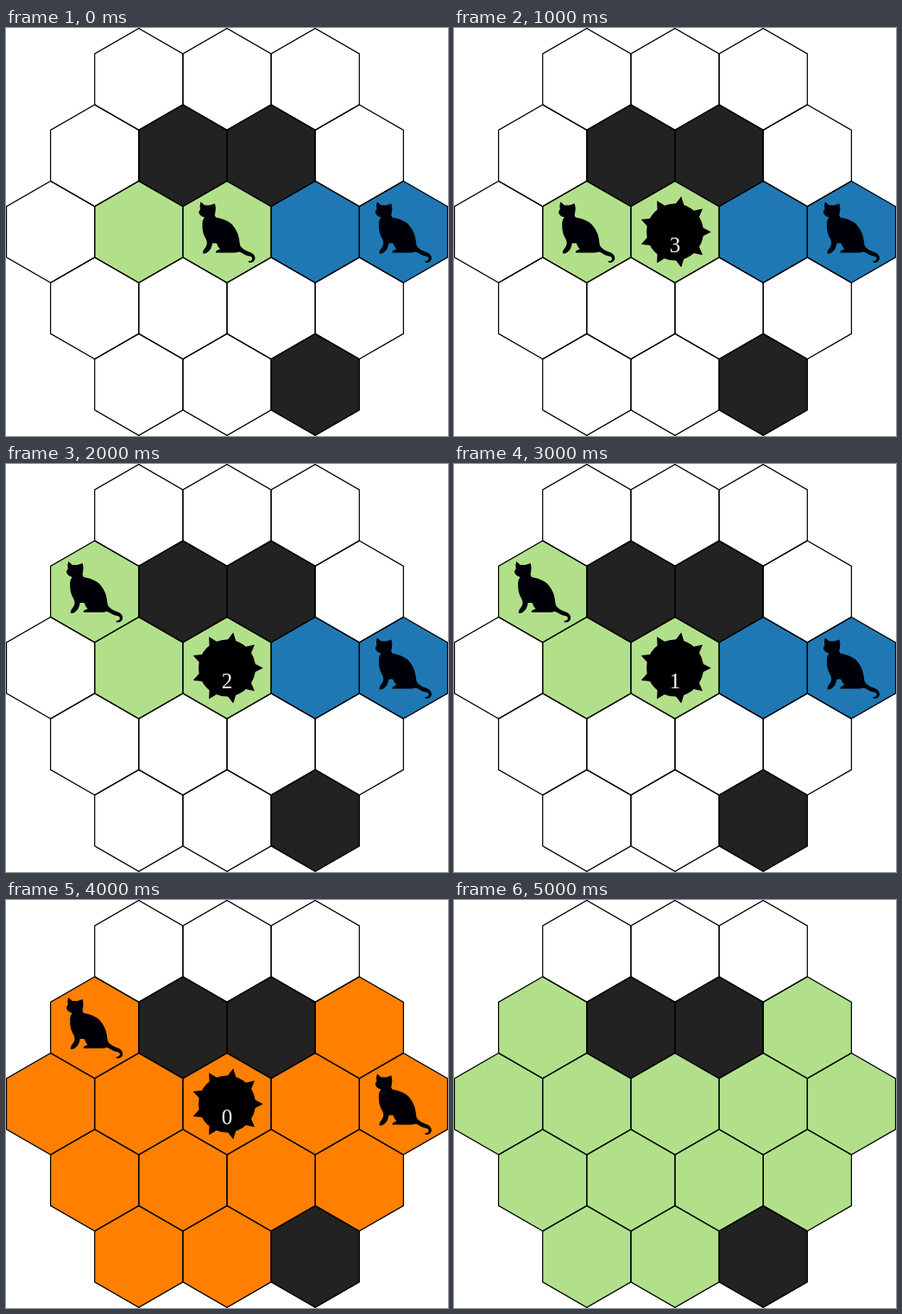
Write an HTML page with a canvas that moves like this. It is 512 by 473 pixels and loops after 6000 ms.

```html
<!DOCTYPE html>
<html lang="en">
<head>
<meta charset="utf-8">
<title>Cats and bomb on a hex board</title>
<style>
html, body { margin: 0; width: 100%; height: 100%; overflow: hidden; background: #fff; }
canvas { display: block; }
</style>
</head>
<body>
<canvas id="stage" width="512" height="473"></canvas>
<script>
const ctx = document.getElementById('stage').getContext('2d');
const GREEN = '#b2e08a', BLUE = '#1f78b4', ORANGE = '#ff8000', DARK = '#222';
const RADIUS = 59, PITCH = 102.2, WALLS = [4, 5, 18];

// Cells are numbered row by row.
const cells = [3, 4, 5, 4, 3].flatMap((count, row) =>
  Array.from({ length: count }, (_, i) => ({
    x: 256 + (i - (count - 1) / 2) * PITCH,
    y: 236.4 + (row - 2) * RADIUS * 1.5
  })));

const polygon = points => new Path2D('M' + points.map(p => p.join()).join('L') + 'Z');
const polar = (r, degrees) => {
  const a = degrees * Math.PI / 180;
  return [r * Math.cos(a), r * Math.sin(a)];
};

const hexagon = polygon([30, 90, 150, 210, 270, 330].map(a => polar(RADIUS, a)));
const spikes = polygon(Array.from({ length: 9 }, (_, i) =>
  [polar(31, i * 40 - 11), polar(41.8, i * 40), polar(31, i * 40 + 11)]).flat());
const disc = new Path2D();
disc.arc(0, 0, 33, 0, 2 * Math.PI);

const cat = new Path2D(`M-30.5-35 Q-28-33-26-31 L-20-31 Q-17-32-14-33
  Q-12.5-28-13.5-23 Q-15-20-13-17 C-4-15 3-13 8-6 C13 1 14 6 15 15
  C17 20 23 22 28 24 C34 27 34 34 28 35.5 Q25 36 24.5 34
  C30 34 31 29 26 28 C20 27 18 24 14 23 Q11 24 8 24 L-13 24 Q-13.5 21-8 20
  Q-11 17-12 13 L-17 13 Q-18 20-22 23 Q-25 26-28 24.5
  Q-28 21-25 18 Q-22 14-24 9 Q-29 1-28.5-8 Q-29-13-26-17
  Q-31-18-32.5-22 Q-33-25-31-26 Q-32-31-30.5-35Z`);

const reached = cells.map((_, i) => i).filter(i => i > 2 && !WALLS.includes(i));
const paint = (...groups) => Object.fromEntries(
  groups.flatMap(([color, ids]) => ids.map(id => [id, color])));
const claimed = extra => paint([GREEN, [8, 9, ...extra]], [BLUE, [10, 11]]);

const steps = [
  { colors: claimed([]), cats: [9, 11] },
  { colors: claimed([]), cats: [8, 11], fuse: 3 },
  { colors: claimed([3]), cats: [3, 11], fuse: 2 },
  { colors: claimed([3]), cats: [3, 11], fuse: 1 },
  { colors: paint([ORANGE, reached]), cats: [3, 11], fuse: 0 },
  { colors: paint([GREEN, reached]), cats: [] }
];

function at(id, draw) {
  ctx.save();
  ctx.translate(cells[id].x, cells[id].y);
  draw();
  ctx.restore();
}

function drawBomb(fuse) {
  ctx.fillStyle = '#000';
  ctx.fill(spikes);
  ctx.fill(disc);
  ctx.fillStyle = '#fff';
  ctx.font = '25px "Liberation Serif", serif';
  ctx.textAlign = 'center';
  ctx.fillText(fuse, 0, 23.6);
}

function drawStep({ colors, cats, fuse }) {
  ctx.fillStyle = '#fff';
  ctx.fillRect(0, 0, 512, 473);
  ctx.strokeStyle = '#000';
  ctx.lineWidth = 1.25;
  cells.forEach((_, id) => at(id, () => {
    ctx.fillStyle = WALLS.includes(id) ? DARK : colors[id] || '#fff';
    ctx.fill(hexagon);
  }));
  cells.forEach((_, id) => at(id, () => ctx.stroke(hexagon)));
  cats.forEach(id => at(id, () => {
    ctx.fillStyle = '#000009';
    ctx.fill(cat);
  }));
  if (fuse !== undefined) at(9, () => drawBomb(fuse));
}

const start = performance.now();
function tick() {
  const elapsed = performance.now() - start;
  drawStep(steps[Math.floor(elapsed / 1000) % steps.length]);
  requestAnimationFrame(tick);
}
tick();
</script>
</body>
</html>
```
